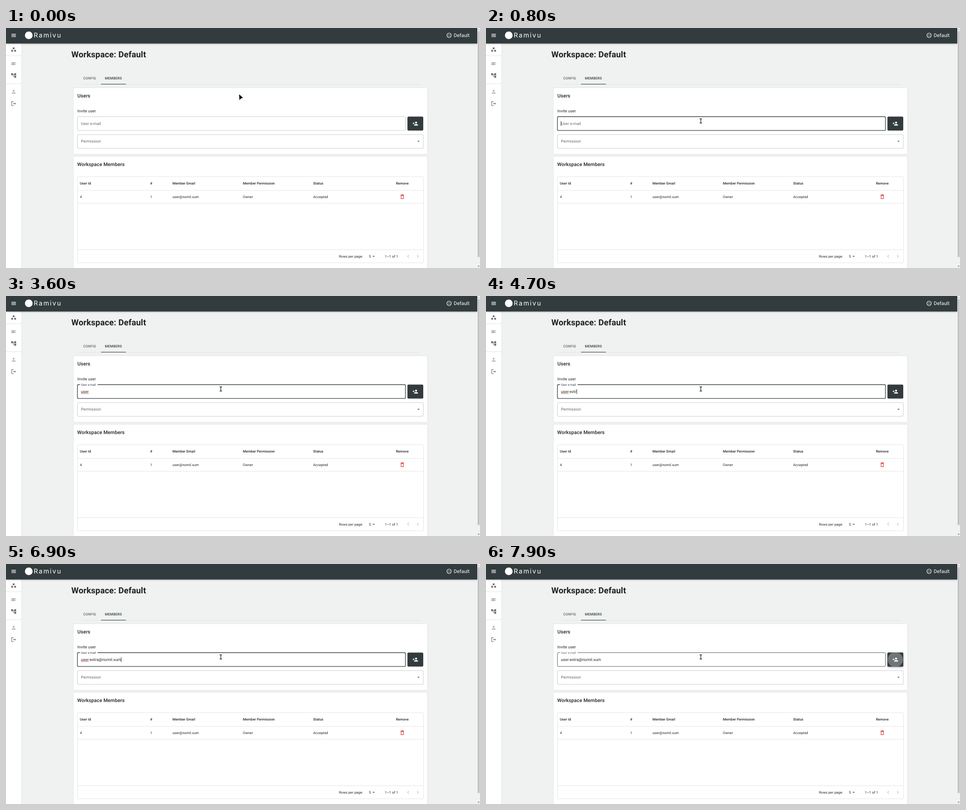
Animation of 1052 by 532 pixels, one loop 8000 ms. Source, as an HTML page:

```html
<!DOCTYPE html>
<html lang="en">
<head>
<meta charset="utf-8">
<title>Workspace members</title>
<style>
  html, body { margin: 0; width: 100%; height: 100%; overflow: hidden; background: #f0f2f2; }
  svg { display: block; width: 1052px; height: 532px; }
  text { font-family: Roboto, "Liberation Sans", sans-serif; fill: rgba(0,0,0,.87); text-rendering: geometricPrecision; white-space: pre; }
  .h4 { font-size: 18.63px; font-weight: 700; letter-spacing: .00735em; }
  .h6 { font-size: 10.96px; font-weight: 500; letter-spacing: .0075em; }
  .body { font-size: 8.767px; letter-spacing: .00938em; }
  .small { font-size: 7.67px; letter-spacing: .01071em; }
  .head { font-size: 7.67px; font-weight: 500; letter-spacing: .01071em; }
  .tab { font-size: 7.67px; font-weight: 500; letter-spacing: .02857em; }
  .muted { fill: rgba(0,0,0,.6); }
  .white { fill: #fff; }
  .brand { font: 400 14.5px Inter, "DejaVu Sans", sans-serif; letter-spacing: 2px; fill: #fff; }
  .line { fill: none; stroke: #dcdcdc; stroke-width: .75; }
  .outline { fill: none; stroke: rgba(0,0,0,.3); stroke-width: .7; }
  .card { fill: #fff; filter: drop-shadow(0 .5px .6px rgba(0,0,0,.2)) drop-shadow(0 .4px 1px rgba(0,0,0,.1)); }
  .bar { fill: #323b3d; filter: drop-shadow(0 1px 1.2px rgba(0,0,0,.28)) drop-shadow(0 .5px 2px rgba(0,0,0,.14)); }
  .raised { fill: #323b3d; filter: drop-shadow(0 .8px .6px rgba(0,0,0,.24)) drop-shadow(0 .5px 1.2px rgba(0,0,0,.14)); }
  .lifted { fill: #323b3d; filter: drop-shadow(0 1.6px 1.3px rgba(0,0,0,.26)) drop-shadow(0 1.5px 3px rgba(0,0,0,.22)); }
</style>
</head>
<body>
<svg id="stage" viewBox="0 0 1052 532" xmlns="http://www.w3.org/2000/svg"></svg>
<script>
const PRIMARY = '#323b3d';
const GREY = 'rgba(0,0,0,.58)';
const FAINT = 'rgba(0,0,0,.27)';
const EMAIL = 'user-extra@nomil.xum';
const KEYS = [2100, 2200, 2400, 2700, 3800, 4300, 4500, 4600, 4700, 4900,
  5100, 5800, 5900, 6000, 6100, 6300, 6500, 6700, 6800, 6900];
const CARET_OFF = [[1400, 2000], [3200, 3800], [5700, 5800]];
const POINTER = [[0, 517.3, 147], [300, 511, 164], [400, 496, 206], [500, 484, 240], [600, 478, 222], [700, 476.8, 206]];
const RIPPLE = [[0, 0], [7500, .35], [7600, .7], [7800, .95], [7900, 1]];
const FOCUS = 800, BLUR = 7400, LOOP = 8000;

const icons = {
  menu: 'M3 18h18v-2H3v2zm0-5h18v-2H3v2zm0-7v2h18V6H3z',
  groups: 'M6 13c-2.2 0-4 1.8-4 4s1.8 4 4 4 4-1.8 4-4-1.8-4-4-4zm6-10C9.8 3 8 4.8 8 7s1.8 4 4 4 4-1.8 4-4-1.8-4-4-4zm6 10c-2.2 0-4 1.8-4 4s1.8 4 4 4 4-1.8 4-4-1.8-4-4-4z',
  list: 'M3 9h14V7H3v2zm0 4h14v-2H3v2zm0 4h14v-2H3v2zm16 0h2v-2h-2v2zm0-10v2h2V7h-2zm0 6h2v-2h-2v2z',
  tree: 'M22 11V3h-7v3H9V3H2v8h7V8h2v10h4v3h7v-8h-7v3h-2V8h2v3z',
  person: 'M12 12c2.21 0 4-1.79 4-4s-1.79-4-4-4-4 1.79-4 4 1.79 4 4 4zm0 2c-2.67 0-8 1.34-8 4v2h16v-2c0-2.66-5.33-4-8-4z',
  logout: 'M17 8l-1.41 1.41L17.17 11H9v2h8.17l-1.58 1.58L17 16l4-4-4-4zM5 5h7V3H5c-1.1 0-2 .9-2 2v14c0 1.1.9 2 2 2h7v-2H5V5z',
  invite: 'M15 12c2.21 0 4-1.79 4-4s-1.79-4-4-4-4 1.79-4 4 1.79 4 4 4zm-9-2V7H4v3H1v2h3v3h2v-3h3v-2H6zm9 4c-2.67 0-8 1.34-8 4v2h16v-2c0-2.66-5.33-4-8-4z',
  bin: 'M6 19c0 1.1.9 2 2 2h8c1.1 0 2-.9 2-2V7H6v12zM8 9h8v10H8V9zm7.5-5l-1-1h-5l-1 1H5v2h14V4z',
  prev: 'M15.41 7.41 14 6l-6 6 6 6 1.41-1.41L10.83 12z',
  next: 'M10 6 8.59 7.41 13.17 12l-4.58 4.59L10 18l6-6z',
  drop: 'M7 10l5 5 5-5z'
};

// Icons are centred on (x, y).
const icon = (name, x, y, fill = GREY) =>
  `<path d="${icons[name]}" fill="${fill}" transform="translate(${x} ${y}) scale(.548) translate(-12 -12)"/>`;
const text = (cls, x, y, str, extra = '') => `<text class="${cls}" x="${x}" y="${y}" ${extra}>${str}</text>`;
const rect = (x, y, w, h, attrs) => `<rect x="${x}" y="${y}" width="${w}" height="${h}" ${attrs}/>`;
const rule = (x1, x2, y) => `<path class="line" d="M${x1} ${y}H${x2}"/>`;
const row = (cls, y, cells) => cells.map((c, i) => text(cls, [164, 320, 369.4, 525.8, 681.8][i], y, c)).join('');

const dots = [[-1.8, -1.8], [1.8, -1.8], [-1.8, 1.8], [1.8, 1.8]]
  .map(([x, y]) => `<circle cx="${983.4 + x}" cy="${16.3 + y}" r=".85" fill="#fff"/>`).join('');

let wave = 'M166.5 216.9';
for (let i = 1; i <= 12; i++) wave += `L${166.5 + i * 1.45} ${i % 2 ? 215.7 : 216.9}`;

const sidebar = rect(0, 34, 34.6, 498, 'fill="#fff"') +
  '<path class="line" d="M34.7 34V532"/>' + rule(0, 34.5, 61.5) + rule(0, 34.5, 123.5) +
  icon('groups', 17, 47.7) + icon('list', 17, 79) + icon('tree', 17, 105.3) +
  icon('person', 17, 141.2, FAINT) + icon('logout', 16.8, 167.5);

const header = rect(0, 0, 1046, 34.3, 'class="bar"') + icon('menu', 17, 16.4, '#fff') +
  '<circle cx="50.5" cy="16.2" r="8.5" fill="#fff"/>' + text('brand', 61.5, 20.5, 'Ramivu') +
  '<circle cx="983.4" cy="16.3" r="5" fill="none" stroke="#fff" stroke-width="1.1"/>' + dots +
  text('white', 993.8, 20.1, 'Default', 'style="font-size:10.96px;fill:#fff"');

const scrollbar = rect(1046, 0, 6, 532, 'fill="#f1f1f1"') + rect(1046.8, 7, 4.4, 500.5, 'fill="#c1c1c1"') +
  '<path d="M1047 4.4h4l-2-2.2z" fill="#a3a3a3"/><path d="M1047 527.2h4l-2 2.2z" fill="#505050"/>';

const tabs = text('tab', 171.4, 113.9, 'CONFIG', 'style="fill:rgba(0,0,0,.6)"') +
  text('tab', 219.6, 113.9, 'MEMBERS', `style="fill:${PRIMARY}"`) + rule(162, 920, 125) +
  rect(211, 123.9, 55.2, 1.1, `fill="${PRIMARY}"`);

const invite = rect(150, 133, 785.3, 146.8, 'rx="2.2" class="card"') +
  text('h6', 158.5, 154.2, 'Users') + text('body', 158.5, 187.3, 'Invite user') +
  rect(158.5, 196.5, 728, 30.6, 'rx="2.2" class="outline" id="field"') +
  rect(0, 195, 0, 3, 'fill="#fff" id="notch"') +
  text('body muted', 0, 0, 'User e-mail', 'id="label"') +
  text('body', 166.2, 215, '', 'id="typed"') +
  `<path id="wave" d="${wave}" fill="none" stroke="#e5403a" stroke-width=".8"/>` +
  rect(0, 206.4, .8, 10.8, 'fill="#000" id="caret"') +
  rect(158.5, 236.3, 767.6, 30.4, 'rx="2.2" class="outline"') +
  text('body muted', 166.2, 254.3, 'Permission') + icon('drop', 915.5, 251.2) +
  rect(891, 196.5, 35, 30.7, 'rx="2.2" class="raised"') +
  rect(891, 196.5, 35, 30.7, 'rx="2.2" class="lifted" id="lift"') +
  '<clipPath id="edge">' + rect(891, 196.5, 35, 30.7, 'rx="2.2"') + '</clipPath>' +
  '<g clip-path="url(#edge)"><circle id="ripple" cx="908.5" cy="211.9" fill="#fff"/></g>' +
  icon('invite', 908.5, 211.9, '#fff');

const members = rect(150, 285, 785.3, 260, 'rx="2.2" class="card"') +
  text('h6', 158, 306.3, 'Workspace Members') +
  rect(158.5, 329.5, 768, 191, 'rx="2.2" class="line"') +
  rule(158.5, 926.5, 360) + rule(158.5, 926.5, 388.5) + rule(158.5, 926.5, 491.5) +
  row('head', 347, ['User Id', '#', 'Member Email', 'Member Permission', 'Status']) +
  text('head', 879.5, 347, 'Remove', 'text-anchor="middle"') +
  row('small', 376.6, ['4', '1', 'user@nomil.xum', 'Owner', 'Accepted']) +
  icon('bin', 879.5, 374, '#d32f2f') +
  text('small', 738.9, 508.7, 'Rows per page:') + text('small', 805.6, 508.7, '5') + icon('drop', 816, 506) +
  text('small', 840.8, 508.7, '1–1 of 1') +
  icon('prev', 892.6, 506, FAINT) + icon('next', 914, 506, FAINT);

const pointers = '<path id="arrow" d="M0 0L9 8.1L4.6 8.7L.9 12.8Z" fill="#000" stroke="#fff" stroke-width=".5" paint-order="stroke"/>' +
  '<path id="beam" d="M-2.6 -4.8Q-.4 -4.8 0 -4.2Q.4 -4.8 2.6 -4.8M0 -4.4V4.4M-2.6 4.8Q-.4 4.8 0 4.2Q.4 4.8 2.6 4.8" fill="none" stroke="#000" stroke-width="1.2"/>';

const $ = id => document.getElementById(id);
$('stage').innerHTML = rect(0, 0, 1052, 532, 'fill="#f0f2f2"') + sidebar + header + scrollbar +
  text('h4', 145, 64.9, 'Workspace: Default') + tabs + invite + members + pointers;

const set = (id, attrs) => { for (const k in attrs) $(id).setAttribute(k, attrs[k]); };
const show = (id, on) => set(id, { visibility: on ? 'visible' : 'hidden' });
const latest = (steps, t) => steps.filter(s => s[0] <= t).pop();

function movePointer(t) {
  const [, x, y] = latest(POINTER, t);
  const overField = y > 197 && y < 227;
  show('arrow', !overField);
  show('beam', overField);
  set(overField ? 'beam' : 'arrow', { transform: `translate(${x} ${y})` });
  return overField;
}

function drawField(t, hover) {
  const focused = t >= FOCUS && t < BLUR;
  set('field', {
    style: focused ? `stroke:${PRIMARY};stroke-width:1.3` : hover ? 'stroke:rgba(0,0,0,.87);stroke-width:.75' : ''
  });

  const p = Math.min(1, Math.max(0, (t - FOCUS) / 300));
  const up = 1 - (1 - p) ** 3;
  set('label', {
    transform: `translate(166.2 ${215 - 16.3 * up}) scale(${1 - .25 * up})`,
    style: focused && t > FOCUS ? `fill:${PRIMARY}` : ''
  });
  set('notch', { x: 164, width: 39.3 * up });

  const count = KEYS.filter(k => k <= t).length;
  $('typed').textContent = EMAIL.slice(0, count);
  const end = count ? $('typed').getComputedTextLength() : 0;
  set('caret', { x: 166.1 + end });
  show('caret', focused && !CARET_OFF.some(([a, b]) => t >= a && t < b));
  show('wave', focused && t >= 3600);
}

function drawButton(t) {
  const size = latest(RIPPLE, t)[1];
  set('ripple', { r: 16.8 * size, opacity: .1 + .2 * size });
  set('lift', { opacity: Math.min(1, Math.max(0, (t - BLUR) / 200)) });
}

const start = performance.now();
function frame(now) {
  const t = Math.floor((Math.max(0, now - start) % LOOP) / 100) * 100;
  drawField(t, movePointer(t));
  drawButton(t);
  requestAnimationFrame(frame);
}
frame(start);
</script>
</body>
</html>
```
